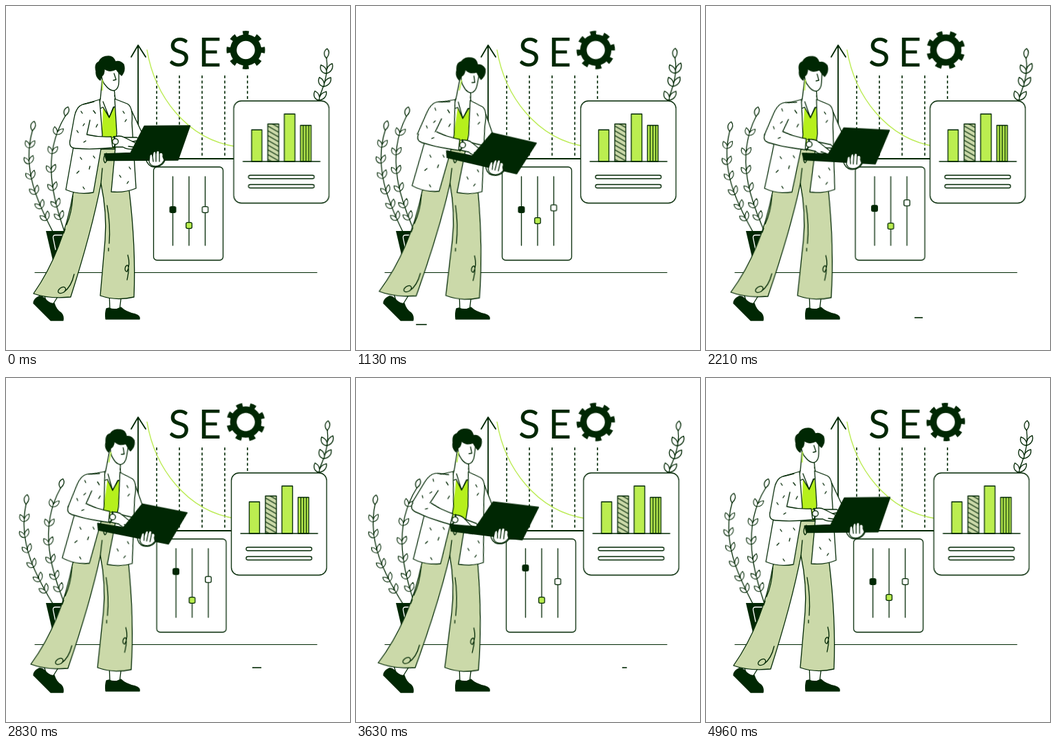
An HTML page without scripts that plays this animation: 500 by 500 pixels, repeating every 5000 ms.

```html
<!DOCTYPE html>
<html lang="en">
<head>
<meta charset="utf-8">
<title>SEO</title>
<style>
:root { --ink: #002703; --lime: #bbee50; --sage: #cbd9a9; }
html, body { margin: 0; width: 100%; height: 100%; overflow: hidden; background: #fff; }
svg { display: block; width: 100vw; height: 100vh; }
.line { fill: none; stroke: var(--ink); stroke-width: 1.3; stroke-linecap: round; stroke-linejoin: round; }
.white { fill: #fff; }
.ink { fill: var(--ink); }
.lime { fill: var(--lime); }
.sage { fill: var(--sage); }
.plain { stroke: none; }
.open { fill: none; }
text { font: 58px Lato, "Open Sans", sans-serif; fill: var(--ink); }

/* gentle back-and-forth */
.sway { animation: sway 2.5s cubic-bezier(.37,0,.63,1) infinite alternate; }
@keyframes sway { from { transform: rotate(var(--a)); } to { transform: rotate(var(--b)); } }
#chart { animation: drift 2.5s cubic-bezier(.37,0,.63,1) -.65s infinite alternate; }
@keyframes drift { from { transform: translateX(1.5px); } to { transform: translateX(-5.2px); } }

#gear { transform-origin: 348.5px 64px; animation: spin 5s linear infinite; }
@keyframes spin { to { transform: rotate(360deg); } }

.loop { animation: 5s ease-in-out infinite; }
#mixer { animation-name: mixer; }
@keyframes mixer {
  0%, 100% { transform: none; animation-timing-function: ease-out; }
  19% { transform: translateX(-2.2px); }
  60% { transform: translateX(4.6px); animation-timing-function: ease-in; }
  87.6% { transform: translateX(1.8px); animation-timing-function: linear; }
}
#k1 { animation-name: k1; }
@keyframes k1 { 0%, 38%, 96%, 100% { transform: none; } 68% { transform: translateY(-21px); } }
#k2 { animation-name: k2; }
@keyframes k2 { 0%, 92%, 100% { transform: none; } 24% { transform: translateY(-7px); } 56%, 70% { transform: translateY(4px); } }
#k3 { animation-name: k3; }
@keyframes k3 { 0%, 12%, 66%, 100% { transform: none; } 42% { transform: translateY(-10px); } }

/* floor strokes drawing in and out */
.trim { stroke-linecap: butt; stroke-dasharray: 0 100; animation: trim 5s linear infinite; }
@keyframes trim {
  0% { stroke-dasharray: 0 100; stroke-dashoffset: 0; }
  10% { stroke-dasharray: 75 100; stroke-dashoffset: 0; }
  24%, 100% { stroke-dasharray: 0 100; stroke-dashoffset: -100; }
}

#torso { transform-origin: 140px 212px; animation-name: torso; }
@keyframes torso {
  0%, 100% { transform: none; animation-timing-function: ease-out; }
  22.6% { transform: rotate(6deg); }
  44.2% { transform: rotate(2deg); }
  56.6% { transform: rotate(5.7deg); animation-timing-function: ease-in; }
  72.6% { transform: rotate(4deg); animation-timing-function: ease-out; }
  87.6% { transform: rotate(-1deg); animation-timing-function: ease-in; }
}
#head { transform-origin: 147px 130px; animation-name: head; }
@keyframes head {
  0%, 87.6%, 100% { transform: none; }
  22.6% { transform: rotate(5deg); }
  44.2% { transform: rotate(1deg); }
  56.6% { transform: rotate(4deg); }
  72.6% { transform: rotate(3deg); }
}
#laptop { transform-origin: 157px 164px; animation-name: laptop; }
@keyframes laptop {
  0%, 100% { transform: none; animation-timing-function: ease-out; }
  22.6% { transform: rotate(13.4deg); }
  44.2% { transform: rotate(3.5deg); }
  56.6% { transform: rotate(11.5deg); animation-timing-function: ease-in; }
  72.6% { transform: rotate(7.3deg); animation-timing-function: ease-out; }
  87.6% { transform: rotate(-2.3deg); animation-timing-function: ease-in; }
}
#upper { transform-origin: 122px 146px; animation-name: upper; }
@keyframes upper {
  0%, 100% { transform: none; }
  22.6% { transform: rotate(7.5deg); }
  44.2% { transform: rotate(11deg); }
  56.6% { transform: rotate(6deg); }
  72.6% { transform: rotate(17deg); }
  87.6% { transform: rotate(10deg); }
}
#fore { transform-origin: 159px 197px; animation-name: fore; }
@keyframes fore {
  0%, 100% { transform: none; }
  22.6% { transform: translate(-4px, 5px) rotate(13deg); }
  44.2% { transform: translate(-9px, 4px) rotate(12deg); }
  56.6% { transform: translate(-4px, 5px) rotate(13deg); }
  72.6% { transform: translate(-15px, 9px) rotate(21deg); }
  87.6% { transform: translate(-11px, 3px) rotate(7deg); }
}
#legs { transform-origin: 140px 215px; animation-name: legs; }
@keyframes legs {
  0%, 100% { transform: none; }
  22.6% { transform: rotate(1.8deg); }
  44.2%, 56.6% { transform: rotate(1.1deg); }
  72.6% { transform: rotate(2.2deg); }
  87.6% { transform: rotate(.8deg); }
}
</style>
</head>
<body>
<svg viewBox="0 0 500 500">
<defs>
  <path id="pair" transform="scale(.82)" d="M0 0C-7 0 -10 -6 -8 -12C-2 -10 1 -5 0 0C-1 -8 3 -12 8 -14C10 -8 7 -2 0 0"/>
  <path id="tip" d="M0 0C-5 -5 -4 -11 1 -14C5 -10 4 -5 0 0"/>
  <rect id="knob" x="-4.3" y="-4.3" width="8.6" height="8.6" rx="2"/>
  <pattern id="hatch" width="6" height="6" patternUnits="userSpaceOnUse" patternTransform="rotate(30)">
    <rect class="sage" width="6" height="6"/><path d="M0 3H6" stroke="#002703" stroke-width="1.2"/>
  </pattern>
</defs>

<!-- graph -->
<path class="line" style="stroke-width:1" d="M42 387.5H452"/>
<g class="line">
  <path style="stroke-width:1.8" d="M192 222V58M182 74L192 57L203 74M192 222H335"/>
  <path style="stroke-dasharray:4 3.5;stroke-linecap:butt;stroke-width:1.6" d="M219 101V221M252 101V221M285 101V221M318 101V221M351 101V221"/>
  <path style="stroke:#bdec58;stroke-width:1.5" d="M205 64C216 130 262 194 335 204.500"/>
</g>
<text x="236" y="87.500">S</text>
<text x="279.500" y="87.500">E</text>
<g id="gear" fill="none" stroke="#002703">
  <circle cx="348.5" cy="64" r="18" stroke-width="9.5"/>
  <circle cx="348.5" cy="64" r="24.5" stroke-width="7" pathLength="16" stroke-dasharray=".9 1.1" stroke-dashoffset=".45"/>
</g>

<!-- right sprig -->
<g class="line white sway" style="--a:2.2deg;--b:-2.2deg;animation-delay:-1.3s;transform-origin:453px 137px">
  <path class="open" d="M452 140C462 118 469 98 466 76"/>
  <use href="#pair" transform="translate(455 137) rotate(10) scale(1.25)"/>
  <use href="#pair" transform="translate(462 117) rotate(8) scale(1.25)"/>
  <use href="#pair" transform="translate(466 98) rotate(0) scale(1.25)"/>
  <use href="#tip" transform="translate(466 76)"/>
</g>

<!-- slider panel -->
<g id="mixer" class="loop line">
  <rect class="white" x="214.5" y="234" width="101" height="135.500" rx="5"/>
  <path d="M242.500 248V348M266 248V348M289.500 248V348"/>
  <g transform="translate(242.500 296)"><use id="k1" class="loop ink" href="#knob"/></g>
  <g transform="translate(266 319)"><use id="k2" class="loop lime" href="#knob"/></g>
  <g transform="translate(289.500 296)"><use id="k3" class="loop white" href="#knob"/></g>
</g>

<!-- bar chart panel -->
<g id="chart" class="line">
  <rect class="white" x="330.500" y="138" width="138.500" height="148.500" rx="11"/>
  <rect class="lime" x="356.500" y="180" width="15" height="46"/>
  <rect x="380" y="171.500" width="16" height="54.500" style="fill:url(#hatch)"/>
  <rect class="lime" x="404" y="157" width="15.500" height="69"/>
  <rect class="lime" x="427.500" y="173.500" width="15.500" height="52.500"/>
  <path d="M344 226H456M431.500 174V226M435.500 174V226M439.500 174V226"/>
  <rect class="white" x="352" y="246" width="95.500" height="5" rx="2.500"/>
  <rect class="white" x="352" y="259.500" width="95.500" height="5" rx="2.500"/>
</g>

<!-- potted plants -->
<g class="line white sway" style="--a:1.1deg;--b:-5deg;animation-delay:-4.1s;transform-origin:68px 328px">
  <path class="open" d="M68 328C46 285 24 235 40 181"/>
  <use href="#pair" transform="translate(59.600 311) rotate(-25)"/>
  <use href="#pair" transform="translate(52 294) rotate(-22)"/>
  <use href="#pair" transform="translate(44 273) rotate(-19)"/>
  <use href="#pair" transform="translate(38 251) rotate(-12)"/>
  <use href="#pair" transform="translate(34.800 229) rotate(-4)"/>
  <use href="#pair" transform="translate(35.300 206) rotate(8)"/>
  <use href="#tip" transform="translate(40 181) rotate(8)"/>
</g>
<g class="line white sway" style="--a:2.3deg;--b:-4.5deg;animation-delay:-.8s;transform-origin:85px 328px">
  <path class="open" d="M85 328C70 285 48 220 84 160"/>
  <use href="#pair" transform="translate(79 310) rotate(-17)"/>
  <use href="#pair" transform="translate(73.500 292) rotate(-16)"/>
  <use href="#pair" transform="translate(68 268) rotate(-11)"/>
  <use href="#pair" transform="translate(64.700 242) rotate(-3)"/>
  <use href="#pair" transform="translate(65.400 215) rotate(8)"/>
  <use href="#pair" transform="translate(71.500 187) rotate(20)"/>
  <use href="#tip" transform="translate(84 160) rotate(12)"/>
</g>
<path class="ink" d="M58 327H96L88 387H72Z"/>
<path class="line" style="stroke:#fff" d="M86 333H72Q68 333 68.500 337L72 354"/>

<!-- floor strokes -->
<g class="line" style="stroke-width:1.6">
  <path class="trim" pathLength="100" d="M80 463H108" style="animation-delay:-4.55s"/>
  <path class="trim" pathLength="100" d="M301 453H319" style="animation-delay:-3.37s"/>
  <path class="trim" pathLength="100" d="M358 421H396" style="animation-delay:-2.4s"/>
  <path class="trim" pathLength="100" d="M220 425H263" style="animation-delay:-1.3s"/>
</g>

<!-- feet -->
<g class="line">
  <path class="white" d="M54 415L58 428L68 434L78 418M150 415L151 442H165L168 418"/>
  <path class="ink" d="M48 422Q40 426 40 432L65 457H83Q84 450 80 446Q73 442 70 432Q64 434 57 426Q52 421 48 422Z"/>
  <path class="ink" d="M146 440Q144 446 145 455H194Q195 450 188 448Q174 445 167 438Q158 443 150 439Z"/>
</g>

<!-- trousers -->
<g id="legs" class="loop line">
  <path class="sage" d="M132 208L98 270C88 328 68 378 40 418Q62 426 94 423C111 370 128 310 138 258Q147 300 144 340L137 421Q160 429 186 423Q189 350 179 268L160 208Z"/>
  <path d="M97 276Q96 300 88 318M86 324L84 330M147 290Q152 318 150 345M149 352V356M99 390Q95 408 84 416C76 420 73 415 79 410C85 406 90 411 84 416M177 362Q181 376 176 386C171 386 173 376 177 377C180 382 177 392 176 398M138 258L140 236M144 215Q140 224 144 228Q148 226 146 214"/>
</g>

<g id="torso" class="loop line">
  <!-- far sleeve, neck, shirt -->
  <path class="white" d="M166 139Q178 142 182 151L198 185L186 208L174 190"/>
  <path class="lime plain" style="fill:#b6f01c" d="M141 146L150 161L158 143L161 190V207H139Z"/>
  <path class="white" d="M140 104L137 137L150 162L159 142L157 116"/>
  <path class="white" d="M137 135L135 150L141 147L150 162L141 139M158 130L161 146L156 147L150 162"/>
  <!-- coat -->
  <path class="white" d="M136 136L112 143Q102 146 100 160L98 205L87 267Q106 275 127 271L138 208L140 187Z"/>
  <path class="white" d="M158 135L176 142Q185 146 183 170L189 265Q172 272 153 270L159 205L161 185Z"/>
  <path d="M127 152L130 156M131 176L133 172M170 153L172 156M175 165L173 168M108 220L110 223M122 233L121 237M103 243L106 240M112 263L114 266M127 218L129 221M167 222L169 219M179 234L181 237M165 246L167 249M176 258L178 255"/>
  <g id="head" class="loop">
    <path class="white" d="M138 92Q138 110 146 117Q151 123 157 123Q164 121 164 110V94L152 84Z"/>
    <path d="M157 98L160 107L156 108M139 104C134 103 134 96 139 97"/>
    <path style="stroke:var(--lime);stroke-width:1.800" d="M140.500 108L140 122"/>
    <path class="ink" d="M137 108Q130 103 131 95Q128 84 135 81Q139 73 149 73Q156 73 159 81Q166 79 171 85Q174 94 168 101Q164 98 160 92Q150 97 143 91Q143 100 139 102Z"/>
  </g>
  <g id="upper" class="loop">
    <path class="white plain" d="M123 144L112 143Q102 146 99 163L93 196Q96 206 106 204L118 188L124 163Z"/>
    <path d="M128 139L112 143Q102 146 99 163L93 196M117 189L122 166M109 153L111 156M114 171L112 174M103 181L105 184"/>
  </g>
</g>

<!-- typing arm -->
<g id="fore" class="loop line">
  <path class="white" d="M155 191Q165 187 172 191L190 191L196 195L184 197L192 201L190 207Q178 210 170 205H155"/>
  <path d="M172 191L184 197M178 204L186 205"/>
  <path class="white" d="M118 187Q135 191 153 190L155 206Q125 209 101 207Q91 206 93 196"/>
  <path d="M113 198L116 196"/>
  <path style="stroke-width:2.200" d="M157 190Q161 198 157 206"/>
  <circle class="white" cx="159" cy="197" r="4.200"/>
</g>

<!-- laptop with holding hand -->
<g id="laptop" class="loop line">
  <path class="white" d="M203 222Q206 233 215 234Q228 234 232 222Z"/>
  <path class="ink" d="M143 215L181 213.500L201 174.500L267.500 174L250 224L146 224.500Z"/>
  <path class="white" d="M208 226L209 217Q212 213 213 218L214 213Q217 209 218 214L219 211Q223 209 223 214L225 213Q229 213 228 219L230 224Q225 233 217 233Q209 232 208 226Z"/>
  <path d="M213 218L214 226M218 214V226M223 214V226"/>
</g>
</svg>
</body>
</html>
```
